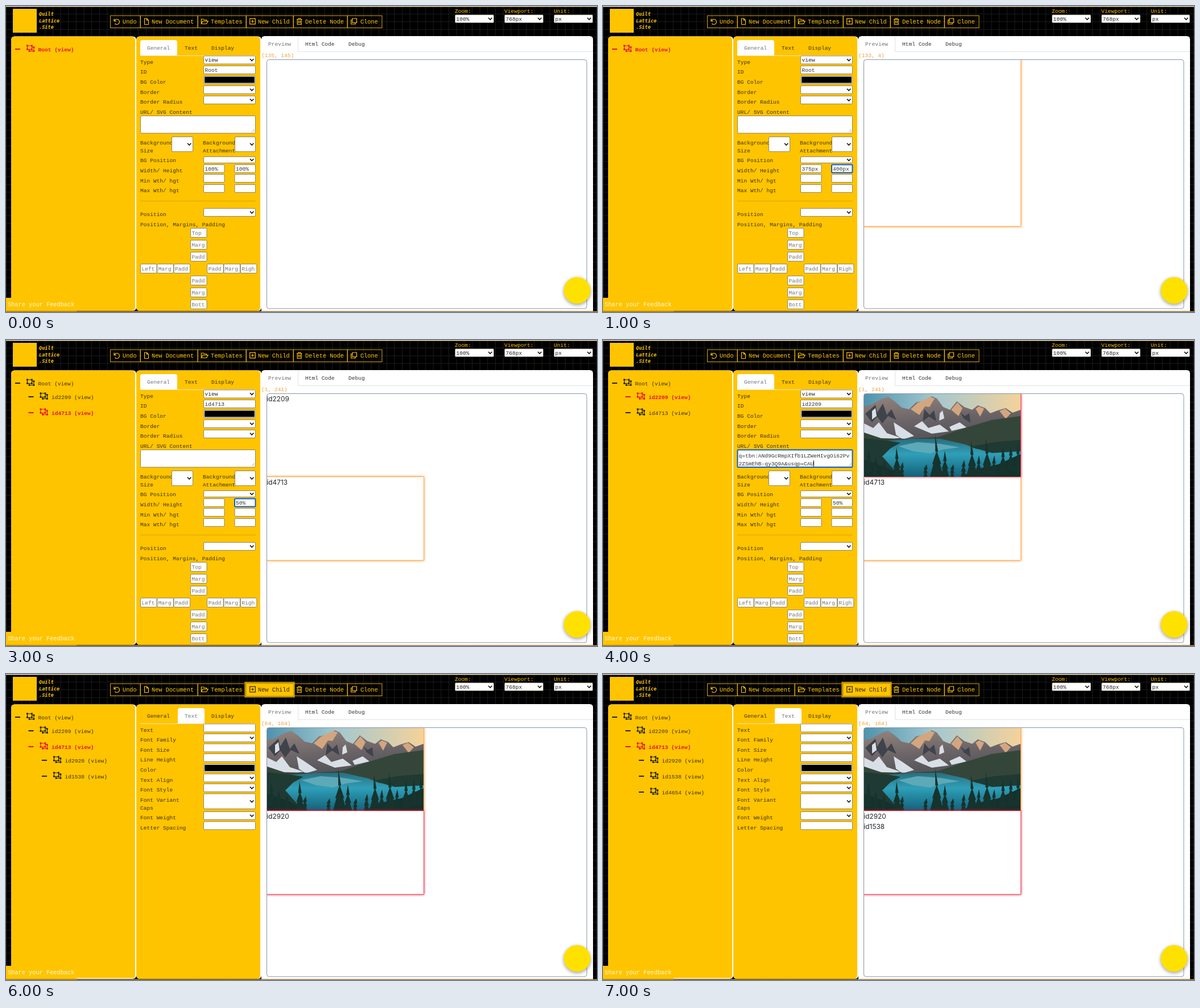
These frames come from a looping animation (1039x539 px, 8 s). An HTML page:

```html
<!DOCTYPE html>
<html lang="en">
<head>
<meta charset="utf-8">
<title>Page builder</title>
<style>
html, body { margin: 0; width: 100%; height: 100%; overflow: hidden; background: #000; }
svg { display: block; }
text { font: 9.55px "Liberation Mono", monospace; }
.bar { font-size: 10.3px; }
.bold { font-weight: bold; }
.brand { font: italic bold 8.6px "DejaVu Sans Mono", monospace; }
.page { font: 11.8px Inter, sans-serif; }
</style>
</head>
<body>
<svg id="stage" width="1039" height="539" viewBox="0 0 1039 539">
  <defs>
    <pattern id="grid" width="13.65" height="13.65" patternUnits="userSpaceOnUse">
      <path d="M0 .5H14M.5 0V14" stroke="#1c1c1c"/>
    </pattern>
    <linearGradient id="sky">
      <stop stop-color="#4f93ad"/><stop offset=".45" stop-color="#a3c8d0"/><stop offset="1" stop-color="#f5d29a"/>
    </linearGradient>
    <linearGradient id="rock" x2=".3" y2="1">
      <stop stop-color="#94857e"/><stop offset=".5" stop-color="#6b6467"/><stop offset="1" stop-color="#474b52"/>
    </linearGradient>
    <linearGradient id="lake" x2="0" y2="1">
      <stop stop-color="#2a6d7d"/><stop offset=".4" stop-color="#2f9fb8"/><stop offset="1" stop-color="#146079"/>
    </linearGradient>
    <clipPath id="view"><rect x="458" y="94" width="563" height="439" rx="4"/></clipPath>
    <clipPath id="photoClip"><path d="M0 0H275V146H0z"/></clipPath>
  </defs>
  <g id="fixed"></g>
  <g id="live"></g>
</svg>
<script>
const GOLD = '#ffc400', RED = '#e8102c', ORANGE = '#ff8c1a', INK = '#3d310a', GREY = '#6c757d', BLUE = '#0b5ed7';
const $ = id => document.getElementById(id);

const rect = (x, y, w, h, fill, more = '') =>
  `<rect x="${x}" y="${y}" width="${w}" height="${h}" fill="${fill}" ${more}/>`;
const path = (d, fill, more = '') => `<path d="${d}" fill="${fill}" ${more}/>`;
const line = (d, color, width = 1) => path(d, 'none', `stroke="${color}" stroke-width="${width}"`);
const text = (x, y, s, fill = INK, cls = '') =>
  `<text x="${x}" y="${y}" fill="${fill}" class="${cls}">${s}</text>`;

// Form controls
const field = (x, y, w, h, value = '', focus = false, color = '#333') =>
  rect(x + .5, y + .5, w - 1, h - 1, '#fff',
    `rx="1.5" stroke="${focus ? BLUE : '#76705c'}" stroke-width="${focus ? 2 : .8}"`) +
  text(x + 2.5, y + h / 2 + 3, value, color);
const select = (x, y, w, h, value) => field(x, y, w, h, value, false, '#222') +
  line(`M${x + w - 10} ${y + h / 2 - 1.7}l3.2 3.2 3.2-3.2`, '#111', 1.6);
const swatch = (x, y, w, h) => field(x, y, w, h) + rect(x + 2, y + 2, w - 4, h - 4, '#000');

const icons = {
  undo: 'M1 1v4h4M1.5 5A4.6 4.6 0 1 1 2.5 9.5',
  file: 'M1.5 .5h4l3 3v7.5h-7zM5.5 .5v3h3',
  folder: 'M.5 10V1.5h4l1 1.5h4v2M.5 10l2.5-5h9l-2.5 5z',
  plus: 'M.7 .7h9.6v9.6H.7zM5.5 3v5M3 5.5h5',
  trash: 'M0 2h9.5M3 2V.5h3.5V2M1.2 2v9h7V2M3.5 4v5M6 4v5',
  clone: 'M3 .5h7.5V8H3zM3 3H.7v7.5H8V8'
};
const buttons = [
  ['Undo', 'undo', 183, 236, 205], ['New Document', 'file', 236, 337, 256],
  ['Templates', 'folder', 337, 422, 360], ['New Child', 'plus', 422, 505, 443],
  ['Delete Node', 'trash', 505, 600, 526], ['Clone', 'clone', 600, 661, 623]
];

function toolbar(hot) {
  return buttons.map(([label, icon, left, right, x]) => {
    const active = label === hot, filled = active && hot === 'New Child';
    const ink = filled ? '#332700' : GOLD;
    return (active ? rect(left - 1, 15.5, right - left + 2, 24, '#000', 'stroke="#b98e08" stroke-width="3.5"') : '') +
      rect(left + .5, 17, right - left - .5, 21.5, filled ? GOLD : 'none', 'stroke="#e0ac00"') +
      `<g transform="translate(${left + 6} 21.5)">${line(icons[icon], ink, 1.2)}</g>` +
      text(x, 31, label, ink, 'bar');
  }).join('');
}

// Two overlapping frames with corner handles
const groupIcon = (x, y, color) => `<g transform="translate(${x} ${y})">` +
  line('M1.5 1.5h8v6.5h-8zM9.5 4h3.5v7H5V8', color, 1.2) +
  [[0, 0], [8, 0], [0, 6.5], [8, 6.5], [11.5, 2.7], [11.5, 9.5], [3.7, 9.5]]
    .map(([dx, dy]) => rect(dx, dy, 2.8, 2.8, color)).join('') + '</g>';

function treeNode(label, depth, y, selected) {
  const color = selected ? RED : INK, x = 16 + depth * 23.5;
  return rect(x, y - 1, 9, 2, selected ? RED : '#222') +
    groupIcon(x + 20, y - 7.5, selected ? RED : '#222') +
    text(x + 40.5, y + 3.5, `${label} (view)`, color, selected ? 'bold' : '');
}

const labels = list => list.map(([s, y, x = 236]) => text(x, y + 3.5, s)).join('');

function generalForm(s) {
  const marg = (x, y, value) => field(x, y, 29.5, 17, value, false, '#777');
  return labels([
    ['Type', 98], ['ID', 115], ['BG Color', 133], ['Border', 151], ['Border Radius', 168],
    ['URL/ SVG Content', 186], ['Background', 240], ['Size', 254], ['Background', 240, 346],
    ['Attachment', 254, 346], ['BG Position', 271], ['Width/ Height', 289], ['Min Wth/ hgt', 307],
    ['Max Wth/ hgt', 324], ['Position', 366], ['Position, Margins, Padding', 384]
  ]) +
    select(347, 87.5, 92, 15, 'view') + field(347, 105, 92, 15, s.id) + swatch(347, 122.5, 92, 15) +
    select(347, 140, 92, 15) + select(347, 158, 92, 15) +
    field(236, 193, 203, 31.5, '', s.focus === 'url') +
    line('M432 222l5-5M435 222l2-2', '#888', .7) +
    (s.url || []).map((row, i) => text(238.5, 206.5 + i * 14, row, '#333')).join('') +
    (s.url ? line('M370.5 212v11', '#111') : '') +
    select(291, 230, 38, 27) + select(402, 230, 37, 27) + select(347, 265, 92, 12) +
    [279, 296, 314].map((y, i) =>
      field(347, y, 37.5, 15, i ? '' : s.w) +
      field(401.5, y, 37.5, 15, i ? '' : s.h, !i && s.focus === 'height')).join('') +
    line('M236 343.5H439', '#d6a508') + select(347, 356, 92, 15) +
    ['Top', 'Marg', 'Padd', '', 'Padd', 'Marg', 'Bott']
      .map((v, i) => v && marg(324, 391 + i * 21, v)).join('') +
    ['Left', 'Marg', 'Padd', '', 'Padd', 'Marg', 'Righ']
      .map((v, i) => v && marg(236 + i * 29.3, 454, v)).join('');
}

function textForm(s) {
  return labels([
    ['Text', 98], ['Font Family', 115], ['Font Size', 133], ['Line Height', 150], ['Color', 168],
    ['Text Align', 186], ['Font Style', 203], ['Font Variant', 221], ['Caps', 235],
    ['Font Weight', 252], ['Letter Spacing', 270]
  ]) +
    field(347, 87.5, 92, 15, s.text) + select(347, 105, 92, 15) + field(347, 122.5, 92, 15) +
    field(347, 140, 92, 15) + swatch(347, 158, 92, 15) + select(347, 175.5, 92, 15) +
    select(347, 193, 92, 15) + select(347, 210.5, 92, 27.5) + select(347, 242, 92, 15) +
    field(347, 259.5, 92, 15);
}

function formTabs(textTab) {
  return line('M236 87.5H439', '#f3e6bd') +
    path(`M${textTab ? '302 87V64q0-4 4-4h39' : '236 87V64q0-4 4-4h57'}q4 0 4 4V87z`, '#fff') +
    text(248, 77, 'General', textTab ? INK : GREY) +
    text(314, 77, 'Text', textTab ? GREY : INK) + text(361, 77, 'Display');
}

const pine = (x, y, h) => path(
  `M${x} ${y - h}l${h * .07} ${h * .4}h-2l${h * .1} ${h * .3}h-2l${h * .08} ${h * .3}h${-h * .32}` +
  `l${h * .08} ${-h * .3}h-2l${h * .1} ${-h * .3}h-2z`, '#16332e');

// Mountain lake in flat tones
const photo = `<g transform="translate(459 95)" clip-path="url(#photoClip)">` +
  rect(0, 0, 275, 146, 'url(#sky)') +
  path('M0 22L14 18 30 9 42 5 54 13 66 24 79 27 91 15 105 12 119 4 128 8 139 23 151 28 163 13 176 23 190 28 200 20 213 25 222 34 235 29 249 25 261 33 275 28V100H0z', 'url(#rock)') +
  path('M82 27l12-11 22-11 8 3-9 15-8-1-10 15zM153 28l11-13 9 10-7 14zM196 26l6-4 9 4-7 14zM238 30l10-4 10 8-9 10z', '#d3a680') +
  path('M2 35l18-16 3 14 10-16 7 20 8-10 9 19-15-7-10 13-9-12-9 10zM106 27l9 10 8-8 4 19-13-8-11 8zM169 32l8 7 8-5 2 17-12-8z', '#3f434b') +
  path('M0 52l16 8 10-10 14 19 24 8-22 4-42-10zM52 50l14 9 22 15-20 6-12-8zM88 57l14-9 11 12 20-6 16 12-30 4zM150 58l18-8 12 9-26 6zM14 30l6-5 2 14-8 6zM133 34l5-5 3 14-9 4z', '#d9dfe6') +
  path('M0 68l30 10 50 1 50-3 44-15 50-15 51-7v60H0z', '#34463a') +
  path('M36 83l48-4 50 0 44 10 20 8 77 2v47H30z', 'url(#lake)') +
  path('M60 92l34-7 40 3 34 6-30 4-22 7-30-4z', '#5da9b8') +
  path('M0 78l40 4 24 4-18 10-14 14 14 16 18 20H0zM186 93l42-8 47-4v20l-50 3z', '#1f3a32') +
  path('M0 116l40 14 30 16H0zM170 146l30-14 36-8 39-18v40z', '#16302b') +
  [[8, 138, 42], [21, 143, 32], [36, 146, 28], [57, 146, 52], [68, 146, 26], [110, 146, 22],
   [125, 146, 74], [142, 146, 46], [157, 146, 22], [176, 146, 30], [188, 146, 64], [202, 146, 38],
   [214, 146, 68], [229, 144, 36], [244, 140, 48], [258, 135, 44], [270, 137, 52]]
    .map(t => pine(...t)).join('') + '</g>';

const box = (y, h, color, content = '') => rect(458, y, 276.5, h, '#fff',
  `stroke="${color}" stroke-opacity=".5" style="filter:drop-shadow(.5px .5px .5px ${color}) drop-shadow(.5px .5px 2px ${color})"`) + content;
const picture = color => box(94, 146.5, color, photo);
const lower = color => box(241, 147, color);
const words = (...list) => list.map(([s, y]) => text(458.5, y, s, '#212529', 'page')).join('');

const root = { sel: 'Root', id: 'Root', w: '375px', h: '400px', kids: [] };
const pair = ['id2209', 'id4713'];
const child = { kids: pair, w: '', h: '50%', xy: '(1, 241)', focus: 'height' };
const nested = { sel: 'id4713', textTab: true, text: '', hot: 'New Child', xy: '(64, 164)' };
const steps = [
  { ...root, w: '100%', h: '100%', xy: '(135, 145)', view: '' },
  { ...root, xy: '(133, 4)', focus: 'height', view: box(94, 294, ORANGE) },
  { ...root, kids: pair, xy: '(133, 4)', hot: 'New Child',
    view: box(94, 294, ORANGE) + words(['id2209', 108], ['id4713', 126]) },
  { ...child, sel: 'id4713', id: 'id4713', view: lower(ORANGE) + words(['id2209', 108], ['id4713', 255]) },
  { ...child, sel: 'id2209', id: 'id2209', focus: 'url',
    url: ['q=tbn:ANd9GcRmpXIfb1LZWeHIvgOi62Pv', '2ZSmEhB-qy3Q9A&amp;usqp=CAU'],
    view: lower(ORANGE) + picture(RED) + words(['id4713', 255]) },
  { textTab: true, text: 'id9883', hot: 'Delete Node', xy: '(299, 271)', kids: [...pair, 'id2920'],
    view: photo + lower(ORANGE) + words(['id2920', 255]) },
  { ...nested, kids: [...pair, 'id2920', 'id1538'],
    view: picture(ORANGE) + lower(RED) + words(['id2920', 255]) },
  { ...nested, kids: [...pair, 'id2920', 'id1538', 'id4654'],
    view: picture(ORANGE) + lower(RED) + words(['id2920', 255], ['id1538', 273]) }
];

// Gold panel with a white right edge
const panel = (x, w) => rect(x, 53.5, w, 483.5, '#fff', 'rx="6"') + rect(x, 53.5, w - 2, 483.5, GOLD, 'rx="6"');

$('fixed').innerHTML =
  rect(0, 0, 1039, 539, '#000') + rect(0, 0, 1039, 539, 'url(#grid)') +
  rect(0, 0, 1039, 1.5, '#f2ddb0') + rect(0, 537.5, 1039, 1.5, '#b98b35') +
  rect(12, 5, 42, 42, GOLD) +
  ['Quilt', 'Lattice', '.Site'].map((s, i) => text(58, 17 + i * 11.5, s, GOLD, 'brand')).join('') +
  [['Zoom:', 789, '100%'], ['Viewport:', 876, '768px'], ['Unit:', 963, 'px']]
    .map(([s, x, v]) => text(x, 11.5, s, GOLD) + select(x, 15, 69, 15, v)).join('') +
  panel(9, 220) + panel(229, 220) +
  path('M449 537.5V59q0-6 6-6H1026q6 0 6 6V537.5z', '#fff') +
  line('M513.5 54V80.5H1032', '#dee2e6') +
  text(461, 69.5, 'Preview', GREY) + text(526, 69.5, 'Html Code', '#333') + text(602, 69.5, 'Debug', '#333') +
  rect(0, 514, 124, 23.5, GOLD) + text(3, 528.5, 'Share your Feedback', '#fff8e0', 'bar');

function draw(s) {
  const tree = treeNode('Root', 0, 76, s.sel === 'Root') + s.kids.map((id, i) =>
    treeNode(id, i < 2 ? 1 : 2, [100, 128, 152, 180, 208][i], s.sel === id)).join('');
  $('live').innerHTML = toolbar(s.hot) + tree + formTabs(s.textTab) +
    (s.textTab ? textForm(s) + rect(124, 535.5, 100, 1.5, '#fff') : generalForm(s)) +
    text(449, 90, s.xy, '#f3a13a') +
    `<g clip-path="url(#view)">${s.view}</g>` +
    rect(458.5, 94.5, 562.5, 438.5, 'none', 'rx="4" stroke="#8496a9"') +
    '<circle cx="1004" cy="501" r="23.5" fill="#ffe100" style="filter:drop-shadow(0 2px 3px #0006)"/>';
}

let shown = -1;
function tick() {
  const step = Math.floor(performance.now() % 8000 / 1000);
  if (step !== shown) draw(steps[shown = step]);
  requestAnimationFrame(tick);
}
tick();
</script>
</body>
</html>
```
